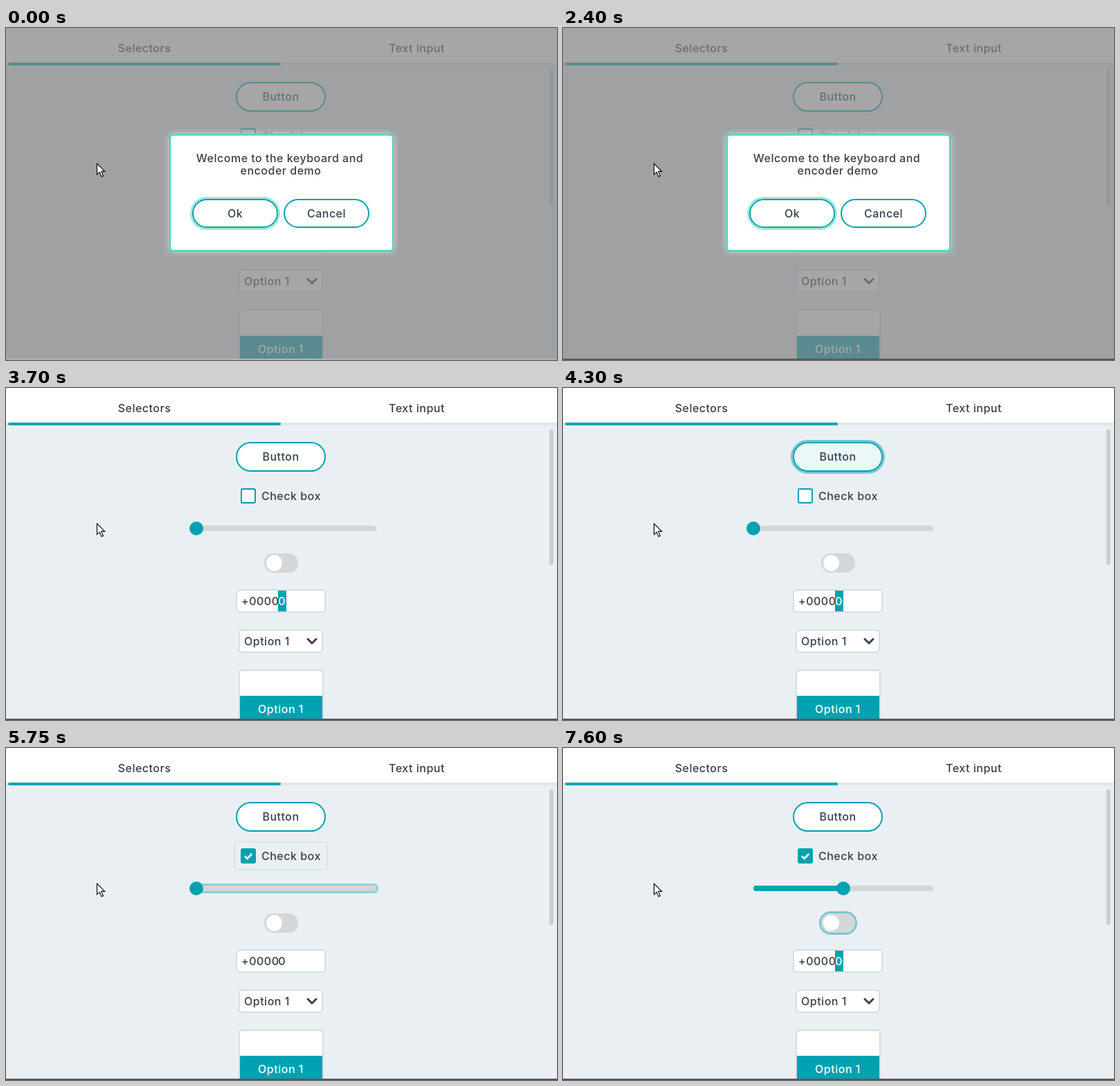
An HTML page that plays this animation: 796x480 px, repeating every 8000 ms.

```html
<!DOCTYPE html>
<html lang="en">
<head>
<meta charset="utf-8">
<title>Keyboard and encoder demo</title>
<style>
html, body { margin: 0; width: 100%; height: 100%; overflow: hidden; background: #eaeff3; }
svg { display: block; width: 796px; height: 480px; }
text { font: 500 16px Inter, "Open Sans", sans-serif; letter-spacing: .5px; fill: #3b3e42; }
.mid { text-anchor: middle; }
.btn { fill: #fff; stroke: #00a2b1; stroke-width: 2; }
.btn-text { fill: #31404f; }
.field { fill: #fff; stroke: #d6dde3; stroke-width: 2; }
.ring { fill: none; stroke: #00a2b1; stroke-opacity: .5; stroke-width: 3; }
.modal .ring { stroke: #44d1b6; }
.teal { fill: #00a2b1; }
.grey { fill: #d4d7d9; }
.white { fill: #fff; }

/* every change is a hard step on one shared 8 s clock */
.edge, .modal, .ok, .cancel, .tab-text, .tab-line, .caret, .press, .ring-btn,
.ring-check, .ring-slider, .ring-switch, .tick, .bar, .knob {
  animation: 8s step-end infinite;
}
.edge { animation-name: edge; }
.modal { animation-name: modal; }
.ok { animation-name: ok; }
.cancel { animation-name: cancel; }
.tab-text { animation-name: tab-text; }
.tab-line { animation-name: tab-line; }
.caret { animation-name: caret; }
.press { animation-name: press; }
.ring-btn { animation-name: ring-btn; }
.ring-check { animation-name: ring-check; }
.ring-slider { animation-name: ring-slider; }
.ring-switch { animation-name: ring-switch; }
.tick { animation-name: tick; }
.bar { animation-name: bar; }
.knob { animation-name: knob; }

@keyframes edge { 0% { fill: #b2b2b4; } 5%, 100% { fill: #5a5860; } }
@keyframes modal { 0% { opacity: 1; } 35%, 100% { opacity: 0; } }
@keyframes ok { 0%, 30%, 100% { opacity: 1; } 25.625% { opacity: 0; } }
@keyframes cancel { 0%, 30%, 100% { opacity: 0; } 25.625% { opacity: 1; } }
@keyframes tab-text { 0%, 46.25%, 100% { fill: #3b3e42; } 35% { fill: #44d1b6; } }
@keyframes tab-line { 0%, 46.25%, 100% { fill: #00a2b1; } 35% { fill: #44d1b6; } }
@keyframes caret {
  0%, 41.875%, 53.75%, 63.125%, 76.875%, 84.375%, 95%, 100% { opacity: 1; }
  36.25%, 50%, 58.75%, 68.125%, 80%, 91.25% { opacity: 0; }
}
@keyframes press {
  0%, 58.75%, 100% { fill: #fff; }
  53.75% { fill: #ebf7f8; }
  55% { fill: #ccecef; }
  56.875% { fill: #e4f5f6; }
}
@keyframes ring-btn {
  0%, 63.125%, 100% { opacity: 0; }
  50% { opacity: 1; }
  60% { opacity: .6; }
  61.25% { opacity: .2; }
}
@keyframes ring-check {
  0%, 76.875%, 100% { opacity: 0; }
  60% { opacity: .4; }
  61.25% { opacity: .8; }
  63.125% { opacity: 1; }
  71.875% { opacity: .2; }
}
@keyframes ring-slider {
  0%, 92.5%, 100% { opacity: 0; }
  71.875% { opacity: .8; }
  76.875% { opacity: 1; }
  91.25% { opacity: .5; }
}
@keyframes ring-switch {
  0%, 100% { opacity: 0; }
  91.25% { opacity: .5; }
  92.5%, 99.99% { opacity: 1; }
}
@keyframes tick { 0% { opacity: 0; } 68.125%, 100% { opacity: 1; } }
@keyframes bar {
  0% { width: 0; }
  76.875% { width: 16px; }
  78.125% { width: 34px; }
  80% { width: 60px; }
  84.375% { width: 123px; }
  88.125%, 100% { width: 130px; }
}
@keyframes knob {
  0% { transform: translateX(0); }
  76.875% { transform: translateX(16px); }
  78.125% { transform: translateX(34px); }
  80% { transform: translateX(60px); }
  84.375% { transform: translateX(123px); }
  88.125%, 100% { transform: translateX(130px); }
}
</style>
</head>
<body>
<svg viewBox="0 0 796 480">
  <rect width="796" height="480" fill="#eaeff3"/>

  <!-- tabs -->
  <rect class="white" width="796" height="50"/>
  <rect y="50" width="796" height="4" fill="#e1e7ec"/>
  <rect class="tab-line" x="3" y="50" width="394" height="4" rx="2"/>
  <text class="mid tab-text" x="200" y="35">Selectors</text>
  <text class="mid" x="593.5" y="35">Text input</text>
  <rect x="785" y="60" width="6" height="196" rx="3" fill="#c9ced3"/>

  <!-- button -->
  <rect class="ring ring-btn" x="330.5" y="76.5" width="133" height="46" rx="23"/>
  <rect class="btn press" x="333" y="79" width="128" height="41" rx="20.5"/>
  <text class="mid btn-text" x="397" y="105">Button</text>

  <!-- check box -->
  <rect class="ring ring-check" x="330" y="136" width="134" height="40" rx="4" style="stroke-width:2"/>
  <rect class="btn" x="340" y="146" width="20" height="20" rx="2"/>
  <g class="tick">
    <rect class="teal" x="340" y="146" width="20" height="20" rx="1"/>
    <path d="M345 156.2l3.6 3.6 6.6-6.8" fill="none" stroke="#fff" stroke-width="2.6"/>
  </g>
  <text x="369" y="162">Check box</text>

  <!-- slider -->
  <rect class="grey" x="275" y="199" width="260" height="8" rx="4"/>
  <rect class="teal bar" x="275" y="199" width="0" height="8" rx="4"/>
  <rect class="ring ring-slider" x="273.5" y="197.5" width="263" height="11" rx="5.5"/>
  <circle class="teal knob" cx="275" cy="203" r="10"/>

  <!-- switch -->
  <rect class="ring ring-switch" x="371.5" y="237.5" width="52" height="31" rx="15.5"/>
  <rect class="grey" x="373" y="239" width="49" height="28" rx="14"/>
  <circle class="white" cx="387.5" cy="253" r="11.5"/>

  <!-- spin box -->
  <rect class="field" x="333" y="292" width="128" height="32" rx="4"/>
  <text x="340" y="314">+0000</text>
  <text x="393.3" y="314">0</text>
  <g class="caret">
    <rect class="teal" x="393" y="293" width="12" height="30"/>
    <text class="white" x="393.3" y="314">0</text>
  </g>

  <!-- drop-down and roller -->
  <rect class="field" x="337" y="350" width="120" height="32" rx="4"/>
  <text x="344" y="372">Option 1</text>
  <path d="M436 363l6 6 6-6" fill="none" stroke="#3b3e42" stroke-width="3" stroke-linecap="round"/>
  <rect class="field" x="337" y="408" width="121" height="90" rx="4"/>
  <rect class="teal" x="338" y="445" width="119" height="33"/>
  <text class="mid white" x="397" y="470">Option 1</text>

  <!-- message box -->
  <g class="modal">
    <rect width="796" height="478" fill="#808080" fill-opacity=".7"/>
    <rect x="237" y="154.5" width="322" height="167.5" rx="4.5" fill="#fff" stroke="#44d1b6" stroke-width="2"
      style="filter:drop-shadow(0 0 5px #d6dde3)"/>
    <text class="mid" x="395.5" y="194">Welcome to the keyboard and</text>
    <text class="mid" x="397" y="212">encoder demo</text>
    <rect class="ring ok" x="267.5" y="245.5" width="127" height="45" rx="22.5"/>
    <rect class="btn" x="270" y="248" width="122" height="40" rx="20"/>
    <text class="mid btn-text" x="331" y="274">Ok</text>
    <rect class="ring cancel" x="399.5" y="245.5" width="127" height="45" rx="22.5"/>
    <rect class="btn" x="402" y="248" width="122" height="40" rx="20"/>
    <text class="mid btn-text" x="463" y="274">Cancel</text>
  </g>

  <rect class="edge" y="478" width="796" height="2"/>
  <path d="M131.5 196v15.8l3.7-3.4 2.8 6.3 2.5-1.1-2.8-6.2h5z" fill="#fff" stroke="#000" stroke-width="1.1"/>
</svg>
</body>
</html>
```
